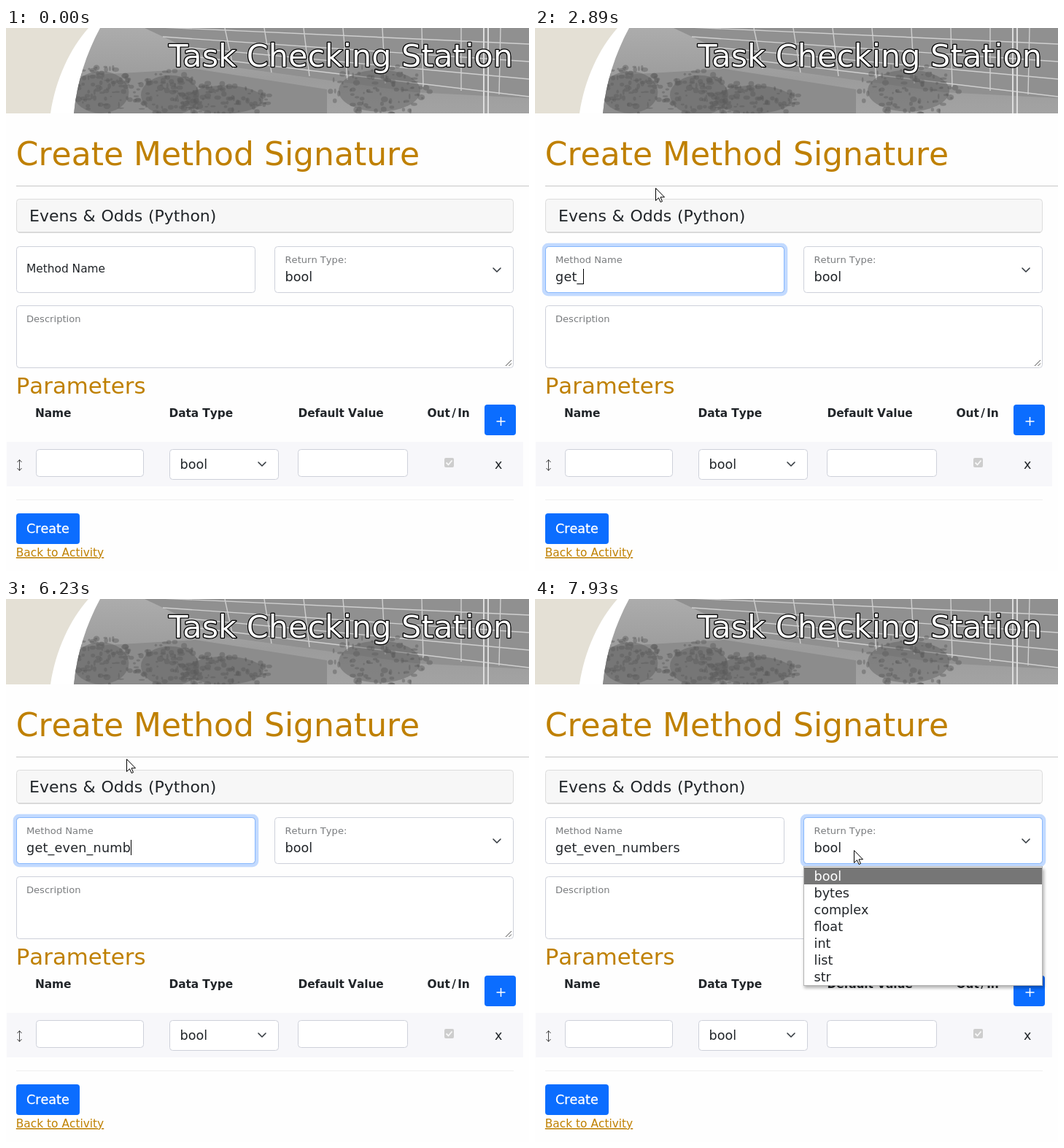
An HTML page for the animation above (8 s loop, 717 by 744 pixels).

```html
<!DOCTYPE html>
<html lang="en">
<head>
<meta charset="utf-8">
<title>Create Method Signature</title>
<style>
  html, body { margin: 0; width: 100%; height: 100%; overflow: hidden; background: #fefefe; }
  svg { display: block; width: 717px; height: 744px; }
  text { font: 17.6px "DejaVu Sans", sans-serif; font-kerning: none; fill: #212529; white-space: pre; }
  .gold { fill: #bf8000; }
  .small { font-size: 13.09px; opacity: .6; }
  .head { font-size: 15.4px; font-weight: 700; letter-spacing: -.08px; }
  .white { fill: #fff; }
  .banner { font-size: 43px; font-kerning: normal; fill: #fff; stroke: #000; stroke-width: 2.6px; paint-order: stroke; stroke-linejoin: round; }
  .box { fill: #fff; stroke: #ced1da; }
  .blue { fill: #0b6dff; }
  .line { fill: none; stroke: #343a40; stroke-width: 1.6; stroke-linecap: round; stroke-linejoin: round; }
  .halo { fill: none; stroke: #0d6efd; stroke-opacity: .25; stroke-width: 4.6; }
  .ring { fill: none; stroke: #86b7fe; }
  #typed { letter-spacing: .21px; }
</style>
</head>
<body>
<svg viewBox="0 0 717 744">
  <defs>
    <linearGradient id="wall" x2="0" y2="1">
      <stop stop-color="#acacac"/><stop offset=".6" stop-color="#9c9c9c"/><stop offset="1" stop-color="#a3a3a3"/>
    </linearGradient>
    <clipPath id="photo"><path d="M129 0C110 35 97 75 93 117H717V0Z"/></clipPath>
    <filter id="soft" x="-10%" y="-10%" width="120%" height="125%"><feGaussianBlur stdDeviation="2.2"/></filter>
  </defs>

  <!-- banner -->
  <rect width="717" height="117" fill="#fff"/>
  <path d="M0 0H113C88 28 68 70 61 117H0Z" fill="#e4e0d5"/>
  <g clip-path="url(#photo)">
    <rect width="717" height="117" fill="url(#wall)"/>
    <path d="M190 0H717V96L560 88L300 52Z" fill="#909090"/>
    <path d="M90 66L260 56L440 84V117H90Z" fill="#8c8c8c"/>
    <path id="frames" fill="none" stroke="#cfcfcf" stroke-width="1.4"/>
    <path d="M655 0V117M661 0V117" fill="none" stroke="#dcdcdc" stroke-width="2"/>
    <g id="trees" fill="#5c5c5c" fill-opacity=".45"/>
  </g>
  <text class="banner" x="695" y="53" text-anchor="end">Task Checking Station</text>

  <!-- page -->
  <text class="gold" x="13.800" y="188" style="font-size:44px">Create Method Signature</text>
  <path d="M14 216.5H717" stroke="#c6c6c6"/>
  <rect x="14.5" y="234.5" width="681" height="45.500" rx="4" fill="#f7f7f7" stroke="#dcdcdc"/>
  <path d="M17 280H693" stroke="#c8c8c8"/>
  <text x="32" y="265" style="font-size:22px;word-spacing:.034em">Evens &amp; Odds (Python)</text>

  <rect class="box" x="14.5" y="299.5" width="327" height="63" rx="4"/>
  <g id="nameFocus">
    <rect class="halo" x="12" y="297" width="332" height="68" rx="6"/>
    <rect class="ring" x="14.5" y="299.5" width="327" height="63" rx="4"/>
  </g>
  <text id="label" x="28">Method Name</text>
  <text id="typed" x="28" y="347"></text>
  <path id="squiggle" fill="none" stroke="#e33" stroke-width="1"/>
  <rect id="caret" y="330" width="1" height="21" fill="#000"/>

  <rect class="box" x="368.5" y="299.5" width="327" height="63" rx="4"/>
  <g id="typeFocus">
    <rect class="halo" x="366" y="297" width="332" height="68" rx="6"/>
    <rect class="ring" x="368.5" y="299.5" width="327" height="63" rx="4"/>
  </g>
  <text class="small" x="382.5" y="322">Return Type:</text>
  <text x="382.5" y="347">bool</text>
  <path class="line" d="M668 329L673 334L678 329"/>

  <rect class="box" x="14.5" y="380.5" width="681" height="85" rx="4"/>
  <text class="small" x="28" y="403">Description</text>
  <path d="M685 463L693 455M689.5 463L693 459.5" stroke="#555"/>

  <text class="gold" x="13.800" y="501" style="font-size:30.8px">Parameters</text>
  <text class="head" x="40" y="533">Name</text>
  <text class="head" x="223.5" y="533">Data Type</text>
  <text class="head" x="400.5" y="533">Default Value</text>
  <text class="head" x="577.5" y="533">Out<tspan dx="2.5">/</tspan><tspan dx="2.5">In</tspan></text>
  <rect class="blue" x="656" y="516" width="43" height="42" rx="4"/>
  <path d="M672.5 539H684.5M678.5 533V545" stroke="#fff" stroke-width="1.5"/>

  <rect x="1" y="567" width="708" height="61" fill="#f7f7fa"/>
  <path d="M18.5 592V606M15.5 595L18.5 591.5L21.5 595M15.5 603L18.5 606.5L21.5 603" fill="none" stroke="#444"/>
  <rect class="box" x="41.5" y="577.5" width="147" height="37" rx="4"/>
  <rect class="box" x="224.5" y="577.5" width="149" height="41" rx="4"/>
  <text x="238.5" y="604">bool</text>
  <path class="line" d="M346 595L351 600L356 595"/>
  <rect class="box" x="400.5" y="577.5" width="150" height="37" rx="4"/>
  <rect x="601" y="589" width="13" height="13" rx="2" fill="#cdcdcd"/>
  <path d="M603.5 595.5L606.5 598.5L611.5 592.5" fill="none" stroke="#f7f7f7" stroke-width="1.8"/>
  <text x="670" y="604">x</text>

  <path d="M14 646.5H696" stroke="#efefef"/>
  <rect class="blue" x="14" y="665" width="87" height="42" rx="4"/>
  <text class="white" x="28" y="692" stroke="#fff" stroke-width=".3">Create</text>
  <text class="gold" x="13.800" y="724" style="font-size:15.4px;text-decoration:underline">Back to Activity</text>

  <g id="menu">
    <rect x="369" y="370" width="329" height="163" fill="#000" opacity=".3" filter="url(#soft)"/>
    <rect x="368.5" y="366.5" width="327" height="163" fill="#fff" stroke="#b5b5b5"/>
    <rect x="369" y="368" width="326" height="23" fill="#767676"/>
  </g>

  <circle id="click" r="11.5" fill="#f8f03a" fill-opacity=".75"/>
  <path id="arrow" d="M0 0V17L4 13.2L6.6 19L9 18L6.5 12.3H12Z" fill="#fff" stroke="#000" stroke-linejoin="round"/>
  <path id="beam" d="M-3 -8H-1L0 -7L1 -8H3M0 -7V7M-3 8H-1L0 7L1 8H3" fill="none" stroke="#444"/>
</svg>
<script>
const LOOP = 8000;
const $ = id => document.getElementById(id);
const add = (parent, tag, attrs, text = '') => {
  const el = document.createElementNS('http://www.w3.org/2000/svg', tag);
  for (const k in attrs) el.setAttribute(k, attrs[k]);
  el.textContent = text;
  parent.append(el);
};
const show = (el, on) => el.setAttribute('visibility', on ? 'visible' : 'hidden');
const within = (t, spans) => spans.some(([a, b]) => t >= a && t < b);
const at = (steps, t) => steps.filter(s => s[0] <= t).pop();

// Banner windows and foliage
let seed = 7;
const rnd = () => (seed = seed * 16807 % 2147483647) / 2147483647;
let frames = '';
for (let i = 0; i < 8; i++) frames += `M${300 + i * 54} 0L${312 + i * 52} ${56 + i * 5}`;
for (let i = 0; i < 4; i++) frames += `M${190 + i * 25} ${i * 14 - 2}L717 ${i * 24 + 22}`;
$('frames').setAttribute('d', frames);
for (const [cx, cy, w, h] of [[130, 88, 48, 36], [225, 92, 50, 34], [300, 98, 66, 24], [512, 86, 70, 36]]) {
  add($('trees'), 'ellipse', { cx, cy, rx: w * .8, ry: h * .8 });
  for (let i = 0; i < 90; i++) {
    const a = rnd() * 6.283, d = Math.sqrt(rnd());
    add($('trees'), 'ellipse', { cx: cx + Math.cos(a) * d * w, cy: cy + Math.sin(a) * d * h, rx: 1 + rnd() * 4, ry: 1 + rnd() * 3 });
  }
}

'bool bytes complex float int list str'.split(' ').forEach((name, i) =>
  add($('menu'), 'text', { x: 382.5, y: 386 + 23 * i, class: i ? '' : 'white' }, name));

let zigzag = 'M28 350';
for (let x = 30; x <= 110; x += 2) zigzag += `L${x} ${x % 4 ? 348.5 : 350.5}`;
$('squiggle').setAttribute('d', zigzag);

const WORD = 'get_even_numbers';
const KEYS = [2220, 2360, 2560, 2890, 3350, 3630, 3900, 4100, 5230, 5560, 5830, 6030, 6230, 6360, 6570, 6770];
const CARET = [[1130, 1610], [2160, 4640], [5160, 7300]];
const CLICKS = [[930, 1270], [7510, 7720]];
const LABEL = [[0, 0], [1130, .6], [1200, 1]];
const NAME_FOCUS = [[0, 0], [1130, .3], [1200, .7], [1270, 1], [7510, .5], [7580, 0]];
const TYPE_FOCUS = [[0, 0], [7510, .5], [7580, 1]];
// time, x, y, pointer
const POINTER = [
  [0, 0, 0, ''],
  [400, 571, 659, 'arrow'], [470, 455, 570, 'arrow'], [530, 310, 472, 'arrow'],
  [600, 190, 398, 'beam'], [660, 122, 343, 'beam'], [730, 97, 319, 'beam'],
  [930, 97, 323, 'beam'], [1000, 96.5, 328, 'beam'],
  [1270, 180, 335, 'beam'], [1330, 320, 335, 'beam'], [1400, 405.5, 310, 'arrow'],
  [1470, 325, 260, 'arrow'], [1530, 215, 226, 'arrow'], [1610, 165.5, 219.5, 'arrow'],
  [6960, 172.5, 198, 'arrow'], [7030, 195, 184.5, 'arrow'], [7100, 250, 192, 'arrow'],
  [7160, 320, 222, 'arrow'], [7230, 385, 264, 'arrow'], [7300, 428, 302, 'arrow'],
  [7380, 440.5, 317.5, 'arrow'], [7860, 439, 332, 'arrow'], [7930, 437.5, 344.5, 'arrow']
];

// The halo grows in width and strength, so it trails the ring
function setFocus(id, level) {
  const [halo, ring] = $(id).children;
  halo.setAttribute('opacity', level * level);
  ring.setAttribute('opacity', level);
}

function draw(t) {
  const lift = at(LABEL, t)[1], label = $('label');
  label.setAttribute('y', 335 - 13 * lift);
  label.style.fontSize = 15.4 - 2.31 * lift + 'px';
  label.style.opacity = 1 - .4 * lift;
  setFocus('nameFocus', at(NAME_FOCUS, t)[1]);
  setFocus('typeFocus', at(TYPE_FOCUS, t)[1]);

  const typed = $('typed');
  typed.textContent = WORD.slice(0, KEYS.filter(k => k <= t).length);
  $('caret').setAttribute('x', Math.round(28 + typed.getComputedTextLength() - .4));
  show($('caret'), within(t, CARET));
  show($('squiggle'), within(t, [[5100, 5230]]));
  show($('menu'), t >= 7580);

  const [, x, y, kind] = at(POINTER, t);
  for (const id of ['arrow', 'beam']) {
    $(id).setAttribute('transform', `translate(${x} ${y})`);
    show($(id), id === kind);
  }
  $('click').setAttribute('cx', x - 1.5);
  $('click').setAttribute('cy', y);
  show($('click'), within(t, CLICKS));
}

const start = performance.now();
function tick() {
  draw((performance.now() - start) % LOOP);
  requestAnimationFrame(tick);
}
tick();
</script>
</body>
</html>
```
